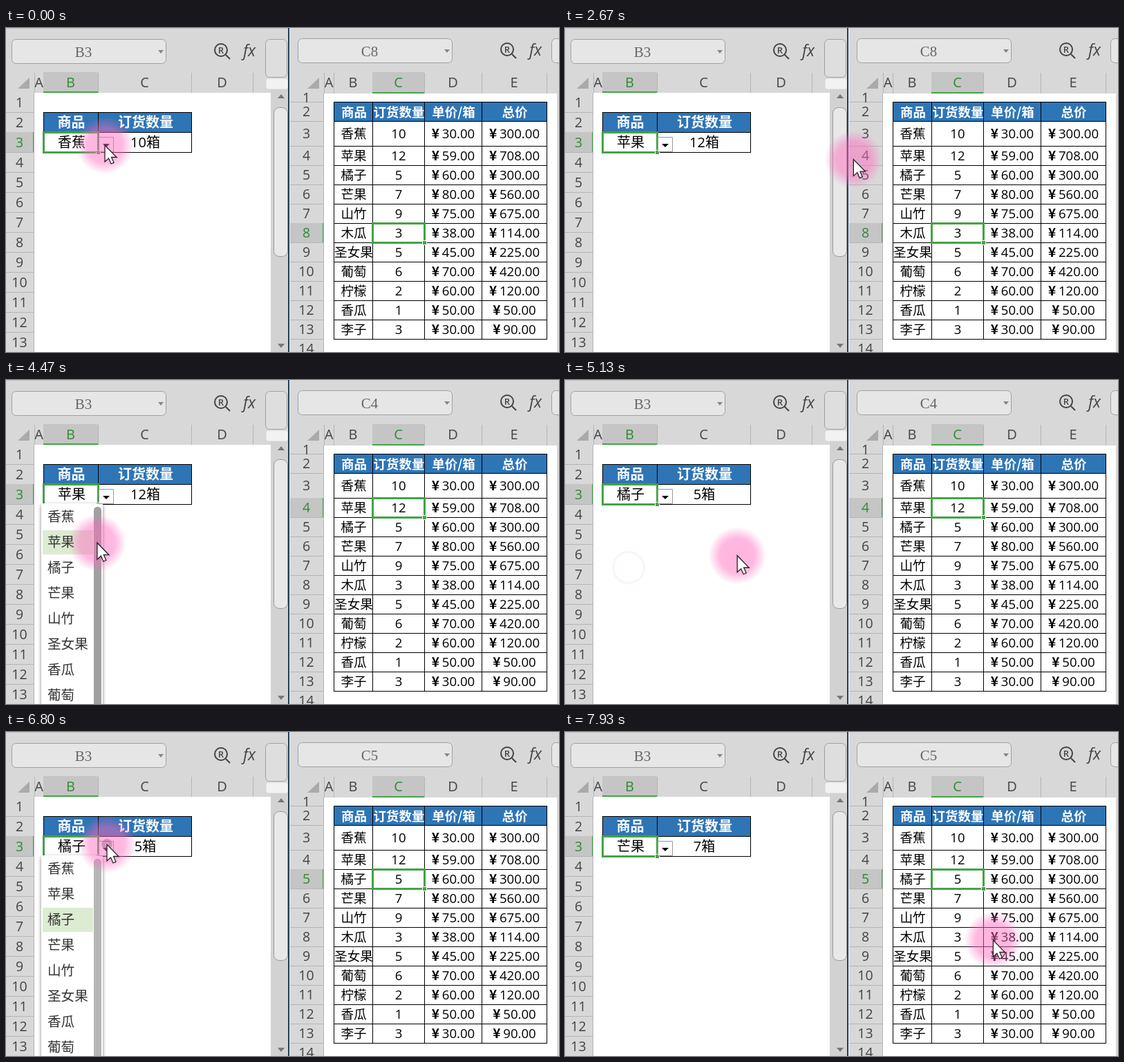
Write an HTML page with a canvas that moves like this. It is 800 px wide and 470 px high and loops after 8000 ms.

```html
<!DOCTYPE html>
<html lang="zh">
<head>
<meta charset="utf-8">
<style>
  html, body { margin: 0; width: 100%; height: 100%; overflow: hidden; background: #d8d8d8; }
  canvas { display: block; }
</style>
</head>
<body>
<canvas id="stage" width="800" height="470"></canvas>
<script>
const ctx = document.getElementById('stage').getContext('2d');
const LOOP = 8000;
const SANS = '"Open Sans", "Noto Sans CJK SC", "Noto Sans CJK", sans-serif';
const CJK = '"Noto Sans CJK SC", "Noto Sans CJK", sans-serif';
const GREEN = '#43a344', GRAY = '#d8d8d8', ACTIVE = '#c5c5c5', LINE = '#b4b4b4', BLUE = '#2e75b6';

const stock = [
  ['香蕉', 10, 30], ['苹果', 12, 59], ['橘子', 5, 60], ['芒果', 7, 80], ['山竹', 9, 75], ['木瓜', 3, 38],
  ['圣女果', 5, 45], ['葡萄', 6, 70], ['柠檬', 2, 60], ['香瓜', 1, 50], ['李子', 3, 30]
];
const menu = ['香蕉', '苹果', '橘子', '芒果', '山竹', '圣女果', '香瓜', '葡萄'];

// Pointer tip: time, x, y
const path = [
  [0, 143, 170], [1400, 143, 170], [1800, 100, 207], [1930, 84, 230], [2230, 84, 230],
  [2900, 541, 176], [3150, 541, 176], [3400, 395, 200], [3870, 160, 172], [4000, 150, 168],
  [4200, 150, 168], [4470, 132, 236], [4700, 92, 272], [4870, 92, 272], [5530, 547, 222],
  [5830, 547, 222], [6470, 149, 166], [6600, 146, 163], [6870, 146, 163], [7250, 90, 308],
  [7430, 90, 308], [7930, 619, 302], [8000, 636, 298]
];
const clicks = [1340, 2200, 3050, 4090, 4800, 5670, 6740, 7370];
const menuOpen = [[1400, 2270], [4140, 4870], [6790, 7440]];
const picks = [2270, 4870, 7440];

function slope(i, k) {
  if (i < 1 || i > path.length - 2) return 0;
  const rate = j => (path[j + 1][k] - path[j][k]) / (path[j + 1][0] - path[j][0]);
  const a = rate(i - 1), b = rate(i);
  return a * b <= 0 ? 0 : 2 * a * b / (a + b);
}

function pointerAt(t) {
  const i = path.findIndex(p => p[0] > t) - 1;
  const [p, q] = [path[i], path[i + 1]], d = q[0] - p[0], u = (t - p[0]) / d;
  return [1, 2].map(k => {
    const s = u * u * (3 - 2 * u);
    return p[k] + (q[k] - p[k]) * s + d * u * (1 - u) * ((1 - u) * slope(i, k) - u * slope(i + 1, k));
  });
}

function rect(x, y, w, h, fill) {
  ctx.fillStyle = fill;
  ctx.fillRect(x, y, w, h);
}

function box(x, y, w, h, r, fill, stroke) {
  ctx.beginPath();
  ctx.roundRect(x + .5, y + .5, w, h, r);
  ctx.fillStyle = fill;
  ctx.fill();
  if (!stroke) return;
  ctx.lineWidth = 1;
  ctx.strokeStyle = stroke;
  ctx.stroke();
}

function shape(points, fill) {
  ctx.beginPath();
  points.forEach(p => ctx.lineTo(...p));
  ctx.closePath();
  ctx.fillStyle = fill;
  ctx.fill();
}

function arrow(x, y, w, h, fill) {
  shape([[x - w, y], [x + w, y], [x, y + h]], fill);
}

function text(str, x, y, size, { color = '#000', weight = 400, font = SANS, align = 'center' } = {}) {
  ctx.font = `${weight} ${size}px ${font}`;
  ctx.textAlign = align;
  ctx.fillStyle = color;
  ctx.fillText(str, x, y + size * .37);
}

function price(value, cx, y) {
  const label = value.toFixed(2);
  ctx.font = `400 18.6px ${SANS}`;
  const left = cx - (15 + ctx.measureText(label).width) / 2;
  text('¥', left, y, 19, { font: CJK, weight: 700, align: 'left' });
  text(label, left + 15, y, 18.6, { align: 'left' });
}

function grid(xs, ys) {
  const [x0, x1, y0, y1] = [xs[0], xs.at(-1), ys[0], ys.at(-1)];
  xs.forEach(x => rect(x, y0, 1, y1 - y0 + 1, '#000'));
  ys.forEach(y => rect(x0, y, x1 - x0 + 1, 1, '#000'));
}

function selection(x, y, w, h) {
  ctx.strokeStyle = GREEN;
  ctx.lineWidth = 3;
  ctx.strokeRect(x + .5, y + .5, w, h);
  rect(x + w - 3, y + h - 3, 7, 7, '#fff');
  rect(x + w - 2, y + h - 2, 5, 5, GREEN);
}

function toolbar(x, y, cellName) {
  box(x, y, 223, 35, 6, '#e6e6e6', '#a0a0a0');
  text(cellName, x + 104, y + 18, 21, { font: '"Liberation Serif", serif', color: '#666' });
  arrow(x + 216, y + 16, 4, 5, '#888');
  const cx = x + 303, cy = y + 16;
  ctx.strokeStyle = '#444';
  ctx.lineWidth = 2;
  ctx.beginPath();
  ctx.arc(cx, cy, 9, 0, 7);
  ctx.moveTo(cx + 7, cy + 7);
  ctx.lineTo(cx + 13, cy + 13);
  ctx.stroke();
  text('R', cx, cy, 13, { color: '#444', weight: 600 });
  text('fx', x + 344, y + 16, 23, { color: '#444', weight: 'italic 500' });
}

// Column letters, row numbers and the white sheet; xs and ys are the cell borders
function sheet(left, top, right, headLeft, xs, ys, names, activeCol, activeRow) {
  rect(left, top, right - left, 470 - top, '#fff');
  shape([[left - 7, 72], [left - 7, 88], [left - 24, 88]], '#aaa');
  xs.slice(0, -1).forEach((x, i) => {
    const on = i === activeCol, w = xs[i + 1] - x;
    if (on) {
      rect(x, 64, w, top - 64, ACTIVE);
      rect(x, top - 2, w, 2, GREEN);
    }
    rect(xs[i + 1], 65, 1, top - 65, LINE);
    text(names[i], x + w / 2, 79, 20, { color: on ? '#2f8a36' : '#444' });
  });
  rect(left, 65, 1, top - 65, LINE);
  ys.slice(0, -1).forEach((y, i) => {
    const on = i + 1 === activeRow, h = ys[i + 1] - y;
    if (on) {
      rect(headLeft, y, left - headLeft, h, ACTIVE);
      rect(left - 2, y, 2, h, GREEN);
    }
    rect(headLeft, ys[i + 1], left - headLeft, 1, LINE);
    const cx = (headLeft + left) / 2 - 1;
    text(i + 1, cx, h < 20 ? y + 6 : y + h / 2, 19.5, { color: on ? '#2f8a36' : '#444' });
  });
  rect(left - 1, top, 1, 470 - top, LINE);
}

function leftPane(t, pointer) {
  const picked = picks.filter(p => t >= p).length;
  toolbar(8, 16, 'B3');
  box(376, 73, 31, 15, 4, '#f2f2f2');
  box(375, 16, 31, 55, 6, '#dedede', '#a0a0a0');
  const ys = Array.from({ length: 14 }, (_, i) => i ? 93 + 29 * i : 94);
  sheet(41, 94, 383, 0, [41, 54, 133, 268, 357], ys, ['A', 'B', 'C', 'D'], 1, 3);

  rect(383, 89, 25, 381, '#d2d2d2');
  arrow(398, 102, 5, -6, '#777');
  arrow(398, 458, 5, 6, '#777');
  box(387, 115, 20, 216, 8, '#e8e8e8', '#999');

  rect(54, 122, 214, 29, BLUE);
  grid([54, 133, 268], [122, 151, 180]);
  text('商品', 94.5, 137, 20, { weight: 700, color: '#fff', font: CJK });
  text('订货数量', 202, 137, 20, { weight: 700, color: '#fff', font: CJK });
  text(stock[picked][0], 95, 166, 20);
  text(stock[picked][1] + '箱', 201.5, 166, 20);
  selection(54, 151, 79, 29);
  if (menuOpen.some(([a, b]) => t >= a && t < b)) dropdown(picked, pointer);
  box(134, 158, 21, 21, 0, '#fff', '#999');
  arrow(145, 168, 5, 5, '#000');
}

function dropdown(picked, [px, py]) {
  ctx.save();
  ctx.shadowColor = 'rgba(0,0,0,.5)';
  ctx.shadowBlur = 5;
  ctx.shadowOffsetY = 2;
  rect(51, 179, 89, 300, '#fff');
  ctx.restore();
  const hover = py > 181 && px < 127 ? Math.floor((py - 181) / 37) : picked;
  rect(53, 181 + 37 * hover, 73, 35, '#dcecd2');
  menu.forEach((name, i) => text(name, 60, 198 + 37 * i, 19.6, { font: CJK, weight: 300, align: 'left', color: '#333' }));
  const onBar = px >= 127 && px < 140 && py > 184;
  box(126.5, 183.5, 11, 300, 5, onBar ? '#a0a0a0' : '#b6b6b6');
}

function rightPane(t) {
  const row = t < 3140 ? 8 : t < 5760 ? 4 : 5;
  rect(411, 0, 389, 470, GRAY);
  rect(408, 0, 2, 470, '#253c5c');
  rect(410, 0, 1, 470, '#eee');
  toolbar(422, 15, 'C' + row);
  box(789, 15, 40, 35, 6, '#e6e6e6', '#a0a0a0');
  const ys = [95, 107, 135, 171];
  for (let y = 199; y <= 480; y += 28) ys.push(y);
  const xs = [474, 530, 605, 688, 782];
  sheet(460, 95, 797, 411, [460, ...xs], ys, ['A', 'B', 'C', 'D', 'E'], 2, row);

  rect(474, 107, 308, 28, BLUE);
  grid(xs, ys.slice(1, 14));
  const centers = [503, 568, 647, 735.5];
  ['商品', '订货数量', '单价/箱', '总价'].forEach((name, i) =>
    text(name, centers[i] + .5, 122, 18.5, { weight: 700, color: '#fff', font: CJK }));
  stock.forEach(([name, count, unit], i) => {
    const y = (ys[i + 2] + ys[i + 3]) / 2;
    text(name, centers[0], y, 18.6);
    text(count, centers[1], y, 18.6);
    price(unit, centers[2], y);
    price(unit * count, centers[3], y);
  });
  selection(530, ys[row - 1], 75, ys[row] - ys[row - 1]);
}

function ripple(age, [x, y]) {
  const p = age / 400;
  if (p < 0 || p >= 1) return;
  ctx.beginPath();
  ctx.arc(x, y, 1 + 26 * p, 0, 7);
  ctx.lineWidth = 6 - 3 * p;
  ctx.strokeStyle = `rgba(${110 + 130 * p},${80 + 40 * p},${110 + 30 * p},${.45 * (1 - p)})`;
  ctx.stroke();
}

function pointerGlow([x, y]) {
  const glow = ctx.createRadialGradient(x, y, 0, x, y, 42);
  [[0, .5], [.6, .47], [.8, .24], [1, 0]].forEach(([at, alpha]) =>
    glow.addColorStop(at, `rgba(255,105,190,${alpha})`));
  rect(x - 42, y - 42, 84, 84, glow);
}

function pointerArrow([x, y]) {
  const outline = [[0, 0], [0, 24], [5.5, 19], [9, 27], [13, 25.3], [9.5, 17.5], [17, 17.5]];
  shape(outline.map(([dx, dy]) => [x + dx, y + dy]), '#fff');
  ctx.strokeStyle = '#222';
  ctx.lineWidth = 1.3;
  ctx.stroke();
}

function draw(t) {
  const pointer = pointerAt(t);
  rect(0, 0, 800, 470, GRAY);
  rect(0, 0, 800, 1, '#c4c4c4');
  leftPane(t, pointer);
  rightPane(t);
  pointerGlow(pointer);
  clicks.forEach(c => ripple(t - c, pointerAt(c)));
  pointerArrow(pointer);
}

function tick() {
  draw(performance.now() % LOOP);
  requestAnimationFrame(tick);
}
tick();
</script>
</body>
</html>
```
